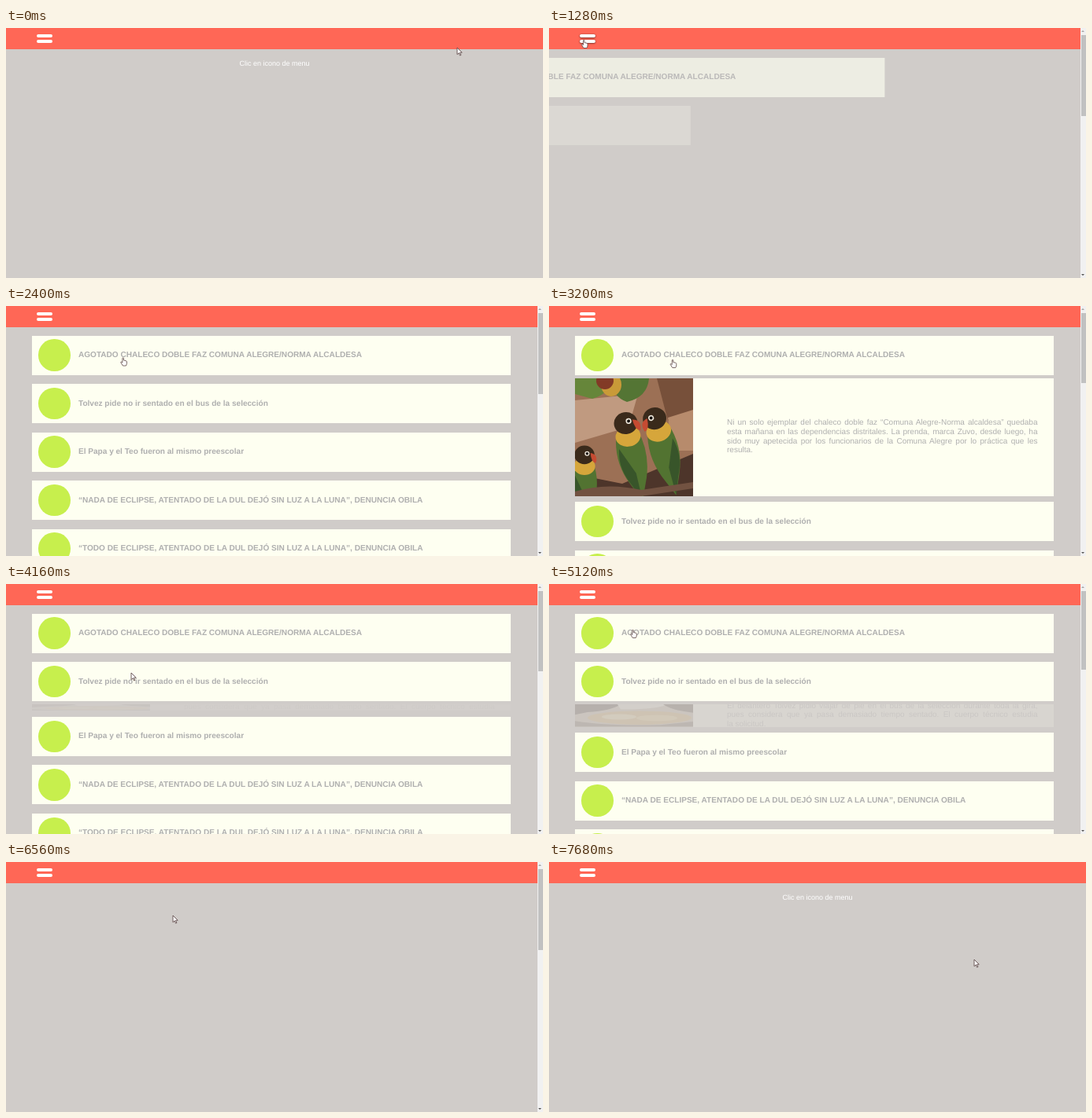
Animation of 682 by 318 pixels, one loop 8000 ms. Source, as an HTML page:

```html
<!DOCTYPE html>
<html lang="es">
<head>
<meta charset="utf-8">
<title>Menú de noticias</title>
<style>
  html, body { margin: 0; width: 100%; height: 100%; overflow: hidden; }
  body {
    position: relative; background: #d0ccc9;
    font-family: "Liberation Sans", Arial, sans-serif;
    text-rendering: geometricPrecision;
  }
  #stage { position: absolute; left: 0; top: 0; width: 682px; height: 318px; overflow: hidden; }
  #stage > *, .row, .panel { position: absolute; }
  header { left: 0; top: 0; width: 682px; height: 27px; background: #ff6756; }
  #icon { left: 39px; top: 8px; width: 20px; height: 11px; }
  #icon i { position: absolute; left: 0; width: 20px; height: 4.2px; border-radius: 2.1px; background: #fff; }
  #icon i + i { top: 6.8px; }
  #icon.hover i { box-shadow: 0 .5px 2px #000b; }
  #hint { left: 0; top: 39px; width: 682px; text-align: center; font-size: 9px; line-height: 12px; color: #fff; }
  .row {
    left: 33.3px; width: 607.7px; height: 50px; box-sizing: border-box; padding-left: 8px;
    display: flex; align-items: center; gap: 10.3px; background: #fefff1;
    font-weight: bold; font-size: 10.07px; color: #afafaf; white-space: nowrap;
  }
  .row::before { content: ""; width: 40.4px; height: 40.4px; border-radius: 50%; background: #c7ef4d; flex: none; }
  .panel {
    left: 33.3px; width: 607.7px; overflow: hidden; background: #fefff1;
    display: flex; align-items: center;
  }
  .panel svg { position: absolute; left: 0; top: 0; width: 150px; height: 100%; }
  .panel div { margin-left: 192.7px; width: 394.5px; font-size: 10px; line-height: 11.6px; color: #b0b0b0; flex: none; }
  .panel p { margin: 0; white-space: nowrap; text-align-last: justify; }
  .panel p:last-child { text-align-last: left; }
  #bar { left: 674.5px; top: 0; width: 7.5px; height: 318px; background: #f1f1f1; }
  #thumb { position: absolute; left: 1px; top: 9px; width: 6px; background: #c1c1c1; }
  #bar::before, #bar::after { content: ""; position: absolute; left: 1.7px; border: 2px solid transparent; }
  #bar::before { top: 1px; border-bottom-color: #a3a3a3; }
  #bar::after { bottom: 1px; border-top-color: #505050; }
  #cursor { left: 0; top: 0; width: 20px; height: 20px; overflow: visible; }
  #cursor path { fill: #fff; stroke: #5c4646; stroke-width: 1.6; stroke-linejoin: round; }
</style>
</head>
<body>
<div id="stage">
  <header></header>
  <div id="icon"><i></i><i></i></div>
  <div id="hint">Clic en icono de menu</div>
  <div id="list">
    <div class="panel">
      <svg viewBox="0 0 150 150" preserveAspectRatio="none">
        <defs>
          <g id="bird">
            <path fill="#527331" d="M-14 8Q-24 42-8 74L4 98L14 70Q24 38 13 8Z"/>
            <path fill="#38552a" d="M-14 28Q-20 52-6 76L4 98L2 62Z"/>
            <ellipse cy="14" rx="16" ry="13" fill="#d6a63b"/>
            <ellipse cy="-3" rx="15" ry="14" fill="#3a2a1b"/>
            <path fill="#c64b32" d="M9-6Q21-4 17 9Q10 8 9-6Z"/>
            <circle cx="4" cy="-5" r="3.6" fill="#eee8dc"/>
            <circle cx="4" cy="-5" r="2" fill="#15100c"/>
          </g>
        </defs>
        <path fill="#9c7055" d="M0 0H150V150H0Z"/>
        <path fill="#c09a80" d="M0 28L80 20L68 62L0 82Z"/>
        <path fill="#77503a" d="M104 0H150V66L118 54Z"/>
        <path fill="#b78b6c" d="M118 50L150 40V92H124Z"/>
        <path fill="#4d352a" d="M0 122L60 134L150 96V150H0Z"/>
        <path fill="#66863a" d="M0 0H46Q44 20 22 26L0 20Z"/>
        <path fill="#547534" d="M44 0H94Q92 24 66 30Q48 24 44 0Z"/>
        <ellipse cx="46" cy="8" rx="13" ry="15" fill="#c99a38"/>
        <ellipse cx="38" cy="3" rx="11" ry="11" fill="#823a26"/>
        <use href="#bird" transform="translate(102 54) rotate(-18) scale(-1 1)"/>
        <use href="#bird" transform="translate(65 60) rotate(-10)"/>
        <use href="#bird" transform="translate(12 100) scale(.85)"/>
        <path fill="#725241" d="M0 144Q40 132 84 142L150 132V140L84 150H0Z"/>
      </svg>
      <div>
        <p>Ni un solo ejemplar del chaleco doble faz “Comuna Alegre-Norma alcaldesa” quedaba</p>
        <p>esta mañana en las dependencias distritales. La prenda, marca Zuvo, desde luego, ha</p>
        <p>sido muy apetecida por los funcionarios de la Comuna Alegre por lo práctica que les</p>
        <p>resulta.</p>
      </div>
    </div>
    <div class="panel">
      <svg viewBox="0 0 150 150" preserveAspectRatio="none">
        <path fill="#b9ab98" d="M0 0H150V150H0Z"/>
        <path fill="#4d4038" d="M0 0H58Q46 44 16 52L0 70Z"/>
        <path fill="#e3ddd2" d="M54 0H118Q104 36 58 34Z"/>
        <path fill="#57483c" d="M112 0H150V56Q122 40 112 0Z"/>
        <ellipse cx="82" cy="90" rx="66" ry="46" fill="#c9a35c"/>
        <ellipse cx="56" cy="84" rx="22" ry="18" fill="#e4cd92"/>
        <ellipse cx="104" cy="92" rx="26" ry="20" fill="#dfc07a"/>
        <path fill="#6f6254" d="M0 112Q40 146 108 138L150 116V150H0Z"/>
      </svg>
      <div>
        <p>El delantero Tolvez pidió viajar de pie en el bus de la selección durante toda la gira,</p>
        <p>pues considera que ya pasa demasiado tiempo sentado. El cuerpo técnico estudia</p>
        <p>la solicitud.</p>
      </div>
    </div>
  </div>
  <div id="bar"><div id="thumb"></div></div>
  <svg id="cursor">
    <path id="arrow" transform="scale(.54)" d="M0 0V16L4 12.5L6.5 18.5L9 17.5L6.5 11.5H11.5Z"/>
    <path id="hand" transform="scale(.5) translate(-6.5 0)" d="M5 1.5Q6.5 0 8 1.5V7L14 8.5Q16 9 16 11V16L14 21H6L1 13Q0 11 2 11L5 13Z"/>
  </svg>
</div>
<script>
  const LOOP = 8000, TICK = 160;
  const OPEN = 1092, CLOSE = 5580, HIDE = 6720;
  const SLIDE = 500, STAGGER = 100, TOGGLE = 400;
  const ROW_TOP = 37.5, PITCH = 61.5, PANEL_H = 150;

  const titles = [
    'AGOTADO CHALECO DOBLE FAZ COMUNA ALEGRE/NORMA ALCALDESA',
    'Tolvez pide no ir sentado en el bus de la selección',
    'El Papa y el Teo fueron al mismo preescolar',
    '“NADA DE ECLIPSE, ATENTADO DE LA DUL DEJÓ SIN LUZ A LA LUNA”, DENUNCIA OBILA',
    '“TODO DE ECLIPSE, ATENTADO DE LA DUL DEJÓ SIN LUZ A LA LUNA”, DENUNCIA OBILA'
  ];
  // opening and closing click of each panel
  const clicks = [[2420, 3310], [4099, 4835]];
  // time, x, y of the pointer tip
  const path = [
    [0, 573, 25], [160, 545, 22], [480, 300, 14], [800, 48, 12], [960, 22, 13], [1120, 44, 15],
    [1760, 45, 15], [2240, 147, 65], [3200, 157, 68], [3440, 157, 69], [3840, 163, 110],
    [4160, 159, 113], [4480, 158, 115], [4800, 157, 112], [5120, 106.5, 58], [5280, 46, 15],
    [5600, 46, 15], [5920, 62, 21], [6560, 212, 68], [7200, 430, 110], [7680, 540, 124]
  ];
  const handTimes = [[1000, 1900], [2200, 3500], [4200, 5800]];

  const $ = id => document.getElementById(id);
  const clamp = v => Math.min(1, Math.max(0, v));
  const swing = p => .5 - Math.cos(Math.PI * clamp(p)) / 2;
  const show = (el, on) => { el.style.display = on ? '' : 'none'; };

  // CSS "ease": cubic-bezier(.25, .1, .25, 1)
  function ease(p) {
    if (p <= 0) return 0;
    if (p >= 1) return 1;
    const bez = (a, b, s) => 3 * a * s * (1 - s) ** 2 + 3 * b * s * s * (1 - s) + s ** 3;
    let lo = 0, hi = 1;
    for (let i = 0; i < 24; i++) {
      const mid = (lo + hi) / 2;
      if (bez(.25, .25, mid) < p) lo = mid; else hi = mid;
    }
    return bez(.1, 1, lo);
  }

  const panels = [...document.querySelectorAll('.panel')];
  const rows = titles.map(title => {
    const row = document.createElement('div');
    row.className = 'row';
    row.textContent = title;
    $('list').append(row);
    return row;
  });

  function pointerAt(t) {
    const k = path.findIndex(point => point[0] > t);
    if (k < 0) return path[path.length - 1].slice(1);
    const [t0, x0, y0] = path[k - 1], [t1, x1, y1] = path[k];
    const p = (t - t0) / (t1 - t0);
    return [x0 + (x1 - x0) * p, y0 + (y1 - y0) * p];
  }

  function drawList(t) {
    let shift = 0;
    rows.forEach((row, i) => {
      const delay = i * STAGGER;
      const shown = ease((t - OPEN - delay) / SLIDE) - ease((t - CLOSE - delay) / SLIDE);
      const top = ROW_TOP + PITCH * i + shift;
      row.style.top = top + 'px';
      row.style.opacity = shown;
      row.style.transform = `translateX(${(shown - 1) * 100}%)`;
      if (!panels[i]) return;
      const [opened, closed] = clicks[i];
      const part = swing((t - opened) / TOGGLE) - swing((t - closed) / TOGGLE);
      const panel = panels[i].style;
      panel.top = top + 54 + 'px';
      panel.height = part * PANEL_H + 'px';
      panel.opacity = part;
      shift += part * PANEL_H;
    });
    $('thumb').style.height = 302 * 318 / (932 + shift) + 'px';
  }

  function drawPointer(t) {
    const [x, y] = pointerAt(t);
    const hand = handTimes.some(([from, to]) => t >= from && t < to);
    $('cursor').style.transform = `translate(${x}px, ${y}px)`;
    show($('hand'), hand);
    show($('arrow'), !hand);
    $('icon').className = hand && y < 27 && x > 36 && x < 62 ? 'hover' : '';
  }

  function render(time) {
    const t = Math.floor(time % LOOP / TICK) * TICK;
    const menu = t >= OPEN && t < HIDE;
    show($('bar'), menu);
    show($('list'), menu);
    show($('hint'), !menu);
    $('icon').style.left = menu ? '38.5px' : '39px';
    drawList(t);
    drawPointer(t);
  }

  const start = performance.now();
  (function frame() {
    render(performance.now() - start);
    requestAnimationFrame(frame);
  })();
</script>
</body>
</html>
```
